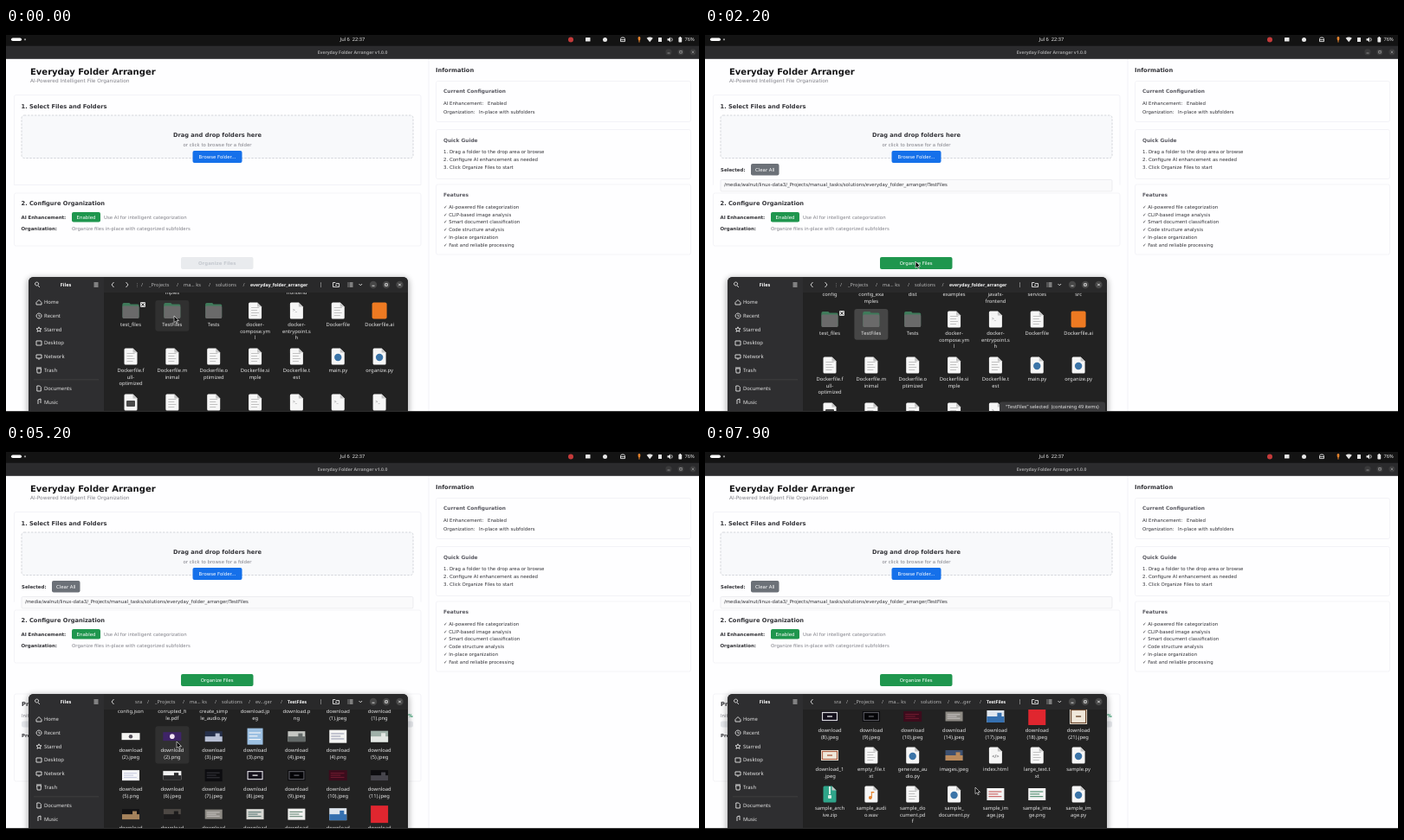
These frames come from a looping animation (800 by 450 pixels, 8000 ms). An HTML page:

```html
<!DOCTYPE html>
<html lang="en">
<head>
<meta charset="utf-8">
<title>Folder arranger demo</title>
<style>
html, body { margin: 0; width: 100%; height: 100%; overflow: hidden; background: #000; }
svg { display: block; width: 800px; height: 450px; }
text { white-space: pre; text-rendering: geometricPrecision; }
.a { font-family: "DejaVu Sans", sans-serif; }
.f { font-family: "Noto Sans", "Open Sans", sans-serif; }
.b { font-weight: bold; }
.m { text-anchor: middle; }
.line { fill: none; stroke: #ebebf1; stroke-width: .6; }
.ic { fill: none; stroke: #e6e6e6; stroke-width: .9; }
.glow { filter: blur(3px); }
</style>
</head>
<body>
<svg id="stage" viewBox="0 0 800 450"></svg>
<script>
const LOOP = 8000, COLS = 7, PITCH = 45;
const INK = '#333338', SOFT = '#808088', PALE = '#e6e6e6', PAPER = '#f6f6f6';

// y is the vertical middle of the capitals
const text = (cls, x, y, size, fill, str) =>
  `<text class="${cls}" x="${x}" y="${(y + size * .36).toFixed(2)}" font-size="${size}" fill="${fill}">${str}</text>`;
const rect = (x, y, w, h, fill, r = 0, extra = '') =>
  `<rect x="${x}" y="${y}" width="${w}" height="${h}" rx="${r}" fill="${fill}" ${extra}/>`;
const disc = (x, y, r, fill) => `<circle cx="${x}" cy="${y}" r="${r}" fill="${fill}"/>`;
const frame = (x, y, w, h) => `<rect class="line" x="${x}" y="${y}" width="${w}" height="${h}" rx="2"/>`;
const stroke = (d, cls = 'ic') => `<path class="${cls}" d="${d}"/>`;
const group = (id, body, extra = '') => `<g id="${id}" ${extra}>${body}</g>`;
const button = (x, y, w, h, fill, label, ink = '#fff', cls = 'a m') =>
  rect(x, y, w, h, fill, 2) + text(cls, x + w / 2, y + h / 2, 5.42, ink, label);
const rows = (x, list, ys) => list.map((s, i) => text('a', x, ys[i], 5.42, INK, s)).join('');

// ---------- desktop bar and application ----------
const topBar = () =>
  rect(0, 8, 800, 12.5, '#131313') +
  rect(6, 11.5, 12, 3.6, '#fff', 1.8) + disc(22, 13.3, 1.1, '#9a9a9a') +
  text('f m', 400, 13.3, 5.7, PALE, 'Jul 6  22:37') +
  disc(652, 13.4, 3, '#c43a3a') + rect(669, 11, 5.5, 4.6, PALE, .6) +
  disc(691.5, 13.4, 2.5, PALE) +
  stroke('M709.5 15.6v-3l1-1.6h3l1 1.6v3zM709.5 13.6h5') +
  rect(729.7, 10, 2.6, 4.4, '#e5822b', 1.3) + rect(730.5, 14, 1, 2.6, '#e5822b') +
  `<path d="M739.6 11.8q3.6-2.8 7.2 0l-3.6 4.4z" fill="${PALE}"/>` +
  rect(753, 11, 4, 5, PALE, .5) +
  `<path d="M763.5 12.2h1.6l2-1.8v6l-2-1.8h-1.6z" fill="${PALE}"/>` + stroke('M768.4 11.4q1.6 2 0 4') +
  rect(776.4, 11, 3.8, 5.4, PALE, .6) + rect(777.5, 10, 1.6, 1, PALE) +
  text('f m', 789, 13.3, 5.7, PALE, '76%');

const winButtons = (xs, y, r) =>
  xs.map(x => disc(x, y, r, '#474747')).join('') +
  stroke(`M${xs[0] - 1.5} ${y + 1.2}h3M${xs[1] - 1.3} ${y - 1.3}h2.6v2.6h-2.6z` +
    `M${xs[2] - 1.3} ${y - 1.3}l2.6 2.6m0-2.6l-2.6 2.6`);

const appTitle = () => rect(0, 20.5, 800, 15, '#2b2b2d') +
  group('appHead', text('f b m', 400, 27.8, 5.1, '#fff', 'Everyday Folder Arranger v1.0.0') +
    winButtons([765, 779, 793], 27.8, 3.6));

const selection = () =>
  text('a b', 18, 163.7, 5.42, INK, 'Selected:') +
  button(53, 157, 32.5, 13.5, '#6c7178', 'Clear All') +
  rect(18, 175.5, 452, 13.5, '#fafafb', 1.5, 'stroke="#e2e2e8" stroke-width=".6"') +
  text('a', 22, 181, 5.42, INK,
    '/media/walnut/linux-data3/_Projects/manual_tasks/solutions/everyday_folder_arranger/TestFiles');

const progress = () => frame(9.5, 288, 469.5, 101) +
  text('a b', 18, 300, 6.67, INK, 'Progress') +
  text('a', 18, 313.5, 5.42, SOFT, 'Initializing...') +
  text('a b', 460.6, 313.5, 5.42, '#2c9a68', '0%') +
  rect(18, 319.5, 452, 7, '#e6e8ec', 2) +
  text('a b', 18, 336, 5.42, INK, 'Processing Log:');

const app = () => rect(0, 35.5, 800, 408, '#fefeff') +
  text('a b', 28, 50.4, 10, '#141416', 'Everyday Folder Arranger') +
  text('a', 28, 60.6, 5.83, SOFT, 'AI-Powered Intelligent File Organization') +
  stroke('M9.5 181.5V79.5q0-2 2-2h465.5q2 0 2 2V181.5', 'line') +
  group('emptyEdge', stroke('M9.5 181.5H479', 'line')) +
  text('a b', 17.5, 90.5, 6.67, INK, '1. Select Files and Folders') +
  `<rect id="drop" x="18" y="101" width="452" height="49.5" rx="3" stroke="#c9ccd2" stroke-width=".8" stroke-dasharray="2.4 1.6"/>` +
  text('a b m', 244, 124, 6.67, INK, 'Drag and drop folders here') +
  text('a m', 244, 135, 5.42, SOFT, 'or click to browse for a folder') +
  button(215.5, 142, 57, 14, '#1570ea', 'Browse Folder...') +
  group('picked', selection()) +
  frame(9.5, 191, 469.5, 61) +
  text('a b', 17.5, 203, 6.67, INK, '2. Configure Organization') +
  text('a b', 17.5, 219, 5.42, INK, 'AI Enhancement:') +
  button(76, 213, 33, 11.5, '#1f964e', 'Enabled') +
  text('a', 113, 219, 5.42, SOFT, 'Use AI for intelligent categorization') +
  text('a b', 17.5, 232.5, 5.42, INK, 'Organization:') +
  text('a', 76, 232.5, 5.42, SOFT, 'Organize files in-place with categorized subfolders') +
  group('runOff', button(202, 265, 83.5, 14, '#e9ebee', 'Organize Files', '#c6cad0', 'a b m')) +
  group('runOn', button(202, 265, 83.5, 14, '#1f964e', 'Organize Files')) +
  group('progress', progress()) +
  stroke('M488 36V443', 'line') +
  text('a b', 496, 48.3, 6.67, INK, 'Information') +
  frame(496.5, 61.5, 294, 47) + frame(496.5, 117.5, 294, 57) + frame(496.5, 181, 294, 81) +
  text('a b', 505, 73, 5.83, '#5a5a62', 'Current Configuration') +
  rows(505, ['AI Enhancement:', 'Organization:'], [87, 97]) +
  text('a', 556, 87, 5.42, INK, 'Enabled') + text('a', 546, 97, 5.42, INK, 'In-place with subfolders') +
  text('a b', 505, 129.5, 5.83, '#5a5a62', 'Quick Guide') +
  rows(505, ['1. Drag a folder to the drop area or browse', '2. Configure AI enhancement as needed',
    '3. Click Organize Files to start'], [143, 152, 160.6]) +
  text('a b', 505, 193.2, 5.83, '#5a5a62', 'Features') +
  rows(505, ['AI-powered file categorization', 'CLIP-based image analysis', 'Smart document classification',
    'Code structure analysis', 'In-place organization', 'Fast and reliable processing'].map(s => '✓ ' + s),
    [207, 215.7, 224.5, 233.2, 242, 250.7]);

// ---------- file manager ----------
const lines = c => Array.from({ length: 4 }, (_, i) => rect(-4.5, -4 + i * 3, i % 2 ? 7 : 9, 1, c)).join('');
const sheet = (fill = PAPER) => `<path d="M-7.5-8q0-1.5 1.5-1.5h8.5l5 5V8q0 1.5-1.5 1.5h-12q-1.5 0-1.5-1.5z" fill="${fill}"/>` +
  '<path d="M2.5-9.5v5h5z" fill="#c4c4c4"/>';
const icons = {
  dir: () => rect(-9.5, -9, 9, 6, '#3f7a5a', 1.5) + rect(-9.5, -7.5, 19, 16, '#3f7a5a', 1.5) + rect(-9.5, -5.5, 19, 14.5, '#6a6a6a', 1.5),
  txt: () => sheet() + lines('#c2c2c2'),
  sh: () => sheet() + text('f', -4.5, -1, 5, '#77777a', '&gt;_'),
  py: () => sheet() + disc(0, 1, 4.2, '#3b74a8'),
  md: () => sheet() + rect(-5, -2, 10, 7, '#4a4a4a', 1),
  ai: () => rect(-8.5, -9.5, 17, 19, '#ee7a22', 2),
  json: () => sheet() + disc(0, 1, 4.4, '#77777a'),
  pdf: () => rect(-8, -9.5, 16, 19, '#d9203f', 2),
  html: () => sheet() + text('f b m', 0, 1.5, 5.4, '#77777a', '&lt;/&gt;'),
  wav: () => sheet() + disc(-1, 4, 1.9, '#e5822b') + rect(0, -3, 1, 7, '#e5822b') + rect(0, -3, 3.5, 1.4, '#e5822b'),
  zip: () => sheet('#2fa58a') + rect(-1, -9, 2, 9, '#d6efe4') + rect(-2, 1, 4, 4, '#d6efe4', 1),
  chart: () => rect(-9.5, -8, 19, 16, PAPER) +
    ['#3b74d8', '#d34a4a', '#e8b53b', '#3aa06a'].map((c, i) => rect(-7.5 + i * 4, 4 - i * 3, 3, 3 + i * 3, c)).join('')
};
const accents = {
  f: (w, h, c) => `<rect x="${1.5 - w / 2}" y="${1.5 - h / 2}" width="${w - 3}" height="${h - 3}" fill="none" stroke="${c}" stroke-width="1.2"/>` + rect(-3, -.7, 6, 1.4, c),
  l: (w, h, c) => [.25, .45, .65].map((k, i) => rect(2 - w / 2, h * (k - .5), w * (.75 - i % 2 * .2), 1.1, c)).join(''),
  h: (w, h, c) => rect(-w / 2, 0, w, h / 2, c) + rect(w * .1, -h * .3, w * .25, h * .4, c),
  d: (w, h, c) => disc(0, 0, h * .28, c),
  s: () => ''
};
const thumb = spec => {
  const [w, h, bg, c, kind] = spec.split(' ');
  return rect(-w / 2, -h / 2, w, h, bg) + accents[kind](+w, +h, c);
};

// image name, then width, height, ground, accent and accent kind
const shots = `.jpeg:20 13 #f0e8da #b07a45 f|.png:20 12 #f4f2ea #c9bf9c l|(1).jpeg:20 13 #f0f0ee #8d9a9c l|(1).png:chart
(2).jpeg:21 8 #f4f4f2 #55505a d|(2).png:21 10 #3f2468 #f2e4f4 d|(3).jpeg:20 12 #26304a #b8c0d4 h|(3).png:18 19 #9cc0e2 #f7f7fa l
(4).jpeg:20 12 #c4c6c2 #636968 h|(4).png:20 15 #f4f4f2 #9ca0b5 l|(5).jpeg:20 13 #9fb0a8 #e4e8e4 h|(5).png:20 12 #f6f7fa #c8cce0 l
(6).jpeg:21 10 #f3f3f3 #2a2a2c h|(7).jpeg:20 14 #0d0d10 #34343a l|(8).jpeg:20 12 #14101c #d8d8da f|(9).jpeg:20 12 #050508 #56565c f
(10).jpeg:21 12 #3c0c1c #6d1a2e l|(11).jpeg:20 12 #0d0d10 #46454c h|(12).jpeg:20 12 #121214 #a4825c h|(13).jpeg:20 12 #4d4844 #1c1b1c h
(14).jpeg:20 11 #8d8a84 #c2bfbc l|(15).jpeg:20 12 #d8d8d4 #5d7a75 l|(16).jpeg:20 13 #f0f0ee #6b8b7a l|(17).jpeg:20 14 #dfe6ee #3570b0 h
(18).jpeg:20 20 #e0262f #fff s|(19).jpeg:20 14 #0a0a0c #49a59a f|(20).jpeg:20 12 #384a4f #8aa0b4 h|(21).jpeg:20 18 #f0e8da #6d4a30 f`
  .split(/[|\n]/).map(s => {
    const [name, spec] = s.split(':');
    if (name === '.jpeg') return ['download.jp/eg', spec];
    if (name === '.png') return ['download.p/ng', spec];
    return ['download/' + name, spec];
  });
const pairs = s => s.split(' ').map(p => p.split(':'));
const homeItems = pairs('config:dir config_exa/mples:dir dist:dir examples:dir javafx-/frontend:dir services:dir src:dir ' +
  'test_files:dir TestFiles:dir Tests:dir docker-/compose.ym/l:txt docker-/entrypoint.s/h:sh Dockerfile:txt Dockerfile.ai:ai ' +
  'Dockerfile.f/ull-/optimized:txt Dockerfile.m/inimal:txt Dockerfile.o/ptimized:txt Dockerfile.si/mple:txt Dockerfile.t/est:txt main.py:py organize.py:py ' +
  'README.md:md notes.txt:txt usage.txt:txt setup.txt:txt build.sh:sh run.sh:sh test.sh:sh');
const testItems = [
  ...pairs('config.json:json corrupted_fi/le.pdf:pdf create_simp/le_audio.py:py'), ...shots,
  ['download_1/.jpeg', '20 12 #f0e8da #b0654a f'],
  ...pairs('empty_file.t/xt:txt generate_au/dio.py:py'), ['images.jpeg', '20 12 #3d5070 #b98a5c h'],
  ...pairs('index.html:html large_text.t/xt:txt sample.py:py sample_arch/ive.zip:zip sample_audi/o.wav:wav ' +
    'sample_do/cument.pd/f:txt sample_/document.py:py'),
  ['sample_im/age.jpg', '20 14 #f4f4f4 #c85a5a l'], ['sample_ima/ge.png', '20 14 #f4f4f4 #4a8a6a l'], ['sample_im/age.py', 'py']
];
// names that leave the folder while it is being sorted
const gone = [[6900, ['config.json']], [7700, ['(11)', '(12)', '(13)']],
  [7800, ['corrupted_fi/le.pdf', '(15)', '(16)']], [7900, ['create_simp/le_audio.py', '(19)', '(20)']]];
const goneAt = name => (gone.find(([, list]) => list.some(k => name === k || name === `download/${k}.jpeg`)) || [Infinity])[0];

const itemSvg = ([name, kind]) => '<g>' + (icons[kind] ? icons[kind]() : thumb(kind)) +
  name.split('/').map((s, i) => text('f m', 0, 16 + i * 7.7, 5.8, PALE, s)).join('') + '</g>';

const crumbs = list => list.map(([x, s, b]) => text(b ? 'f b' : 'f', x, 297, b ? 5.2 : 5.6, b ? '#fff' : '#b4b4b4', s)).join('');
const sidebar = () => {
  const glyphs = ['M35 317.5l3-3 3 3v2.5h-6z', 'M38 330a3 3 0 1 0 .1 0M38 331.5v1.8h1.4', 'M38 345.8l.9 2h2.1l-1.6 1.4.6 2.2-2-1.2-2 1.2.6-2.2-1.6-1.4h2.1z',
    'M35 362h6v5h-6z', 'M35 378h6v4h-6zM38 382v2', 'M35.6 394h5l-.5 5h-4zM35 393h6', 'M35.8 414h3l1.5 1.5v4.5h-4.5z', 'M37 435v-5l3-1v5'];
  return ['Home', 'Recent', 'Starred', 'Desktop', 'Network', 'Trash', 'Documents', 'Music']
    .map((s, i) => text('f', 44, 317 + i * 15.75 + (i > 5 ? 5.5 : 0), 5.9, PALE, s) + stroke(glyphs[i])).join('') +
    rect(32, 406.5, 75, .7, '#454545');
};

const files = () =>
  rect(24, 288, 442, 170, '#000', 8, 'class="glow" opacity=".25"') +
  rect(26, 288, 438, 170, '#222222', 6) +
  `<path d="M26 443V294q0-6 6-6H113V443z" fill="#2e2e30"/>` +
  `<path d="M113 306V288H458q6 0 6 6v12z" fill="#29292a"/>` +
  group('fileHead',
    stroke('M35.5 294a2 2 0 1 0 .1 0M37 298l2 2M101.5 295h5m-5 2h5m-5 2h5M124.5 294l-2.5 3 2.5 3') +
    text('f b m', 69, 297, 5.5, '#fff', 'Files') +
    group('pathHome', stroke('M138.5 294l2.5 3-2.5 3') + crumbs([[148.5, '⋮'], [156, '/'], [165, '_Projects'], [197, '/'], [205, 'ma… ks'], [234, '/'],
      [242, 'solutions'], [273.5, '/'], [282, 'everyday_folder_arranger', 1]])) +
    group('pathTest', crumbs([[149, 'sra'], [163, '/'], [172, '_Projects'], [204, '/'], [212, 'ma… ks'], [241, '/'], [249, 'solutions'],
      [280, '/'], [288, 'ev…ger'], [317, '/'], [325, 'TestFiles', 1]])) +
    [295, 297, 299].map(y => disc(363.5, y, .55, PALE)).join('') +
    stroke('M377.5 299.5v-5h2.5l1 1h3.5v4zM380 297.5h2.4M394.5 295h1m1 0h4m-6 2h1m1 0h4m-6 2h1m1 0h4M407.5 296l1.8 1.8 1.8-1.8') +
    winButtons([424, 439, 454.5], 297, 4.2)) +
  sidebar() +
  group('list', '<rect id="hover" width="39" rx="3"/>' + group('home', homeItems.map(itemSvg).join('')) +
    group('test', testItems.map(itemSvg).join('')) +
    group('emblem', rect(-3, -3, 6, 6, '#cfcfcf', 1) + stroke('M-1.6-1.6l3.2 3.2m0-3.2l-3.2 3.2" style="stroke:#333')), 'clip-path="url(#view)"') +
  group('toast', rect(340, 432.5, 122, 14, '#3a3a3c', 3) +
    text('f m', 401, 438, 5.6, PALE, '“TestFiles” selected  (containing 49 items)'));

const stage = document.getElementById('stage');
stage.innerHTML = '<defs><clipPath id="view"><rect x="113" y="306" width="351" height="137"/></clipPath>' +
  '<clipPath id="screen"><rect y="8" width="800" height="435.5"/></clipPath></defs>' +
  rect(0, 0, 800, 450, '#000') +
  `<g clip-path="url(#screen)">${topBar()}${app()}${appTitle()}${files()}` +
  group('ghost', icons.dir()) +
  group('cursor', '<path d="M0 0v7.6l1.8-1.6 1.2 2.7 1.3-.6-1.2-2.6h2.4z" fill="#0a0a0a" stroke="#f6f6f6" stroke-width=".6"/>') + '</g>';

// ---------- motion ----------
const el = id => document.getElementById(id);
const show = (id, on) => { el(id).style.display = on ? '' : 'none'; };
const move = (node, x, y) => node.setAttribute('transform', `translate(${x.toFixed(2)} ${y.toFixed(2)})`);
// keys: [time, ...values], eased between neighbours
const along = (keys, t) => {
  const i = keys.findIndex(k => k[0] > t);
  if (i < 0) return keys[keys.length - 1].slice(1);
  if (!i) return keys[0].slice(1);
  const [a, b] = [keys[i - 1], keys[i]];
  const u = (t - a[0]) / (b[0] - a[0]), e = u * u * (3 - 2 * u);
  return a.slice(1).map((v, j) => v + (b[j + 1] - v) * e);
};
const pointer = [[0, 194, 333], [200, 194, 333], [900, 252, 134], [1300, 252, 134], [2000, 243, 270], [2700, 243, 270],
  [3400, 200, 325], [3700, 196, 333], [4500, 196, 333], [5100, 197, 343], [5600, 197, 343], [6200, 214, 348], [6500, 214, 348], [7200, 312, 396]];
const homeTop = [[0, 282], [300, 282], [600, 292]];
// top row of the folder: a look down and back, then down to the end
const testTop = [[5000, 327], [5500, 228], [5700, 228], [6200, 327], [6600, 327], [7300, 234], [7600, 234], [7800, 224]];

const views = {
  home: homeItems.map(([name], i) => ({ name, node: el('home').children[i], until: Infinity })),
  test: testItems.map(([name], i) => ({ name, node: el('test').children[i], until: goneAt(name) }))
};

function layOut(items, top, t) {
  const live = items.filter(it => {
    const on = t < it.until;
    it.node.style.display = on ? '' : 'none';
    return on;
  });
  let y = top;
  for (let r = 0; r < live.length; r += COLS) {
    const row = live.slice(r, r + COLS);
    row.forEach((it, c) => {
      it.x = 144 + c * 47.85;
      it.y = y;
      move(it.node, it.x, y);
    });
    y += row.some(it => it.name.split('/').length > 2) ? PITCH + 8 : PITCH;
  }
  return live;
}

function draw(t) {
  const dropped = t >= 1000, running = t >= 2500, inside = t >= 4000;
  const appFocus = running && t < 3700;
  const [cx, cy] = along(pointer, t);
  move(el('cursor'), cx, cy);

  show('picked', dropped);
  show('emptyEdge', !dropped);
  show('runOn', dropped);
  show('runOff', !dropped);
  show('progress', running);
  el('drop').setAttribute('fill', t >= 700 && t < 1400 ? '#e5e9ee' : '#f8f9fb');
  el('appHead').setAttribute('opacity', appFocus ? 1 : .55);
  el('fileHead').setAttribute('opacity', appFocus ? .45 : 1);

  show('ghost', t >= 300 && t < 1200);
  el('ghost').setAttribute('opacity', dropped ? .12 : .75);
  move(el('ghost'), cx - 2, cy + 2);

  show('home', !inside);
  show('test', inside);
  show('pathHome', !inside);
  show('pathTest', inside);
  show('emblem', !inside);
  show('toast', !inside && t >= 200);
  el('toast').setAttribute('opacity', appFocus ? .6 : 1);
  const live = inside ? layOut(views.test, along(testTop, t)[0], t) : layOut(views.home, along(homeTop, t)[0], t);

  const picked = !inside && t >= 200;
  const hit = picked ? live[8] : live.find(it => Math.abs(cx - it.x) < 19.5 && cy > it.y - 12 && cy < it.y + 31);
  show('hover', !!hit);
  if (hit) {
    const box = el('hover');
    box.setAttribute('x', hit.x - 19.5);
    box.setAttribute('y', hit.y - 12);
    box.setAttribute('height', 28 + hit.name.split('/').length * 7.7);
    box.setAttribute('fill', picked ? '#464646' : '#303030');
  }
  if (!inside) move(el('emblem'), live[7].x + 14, live[7].y - 7);
}

function tick() {
  draw(Math.floor(performance.now() % LOOP / 100) * 100);
  requestAnimationFrame(tick);
}
tick();
</script>
</body>
</html>
```
